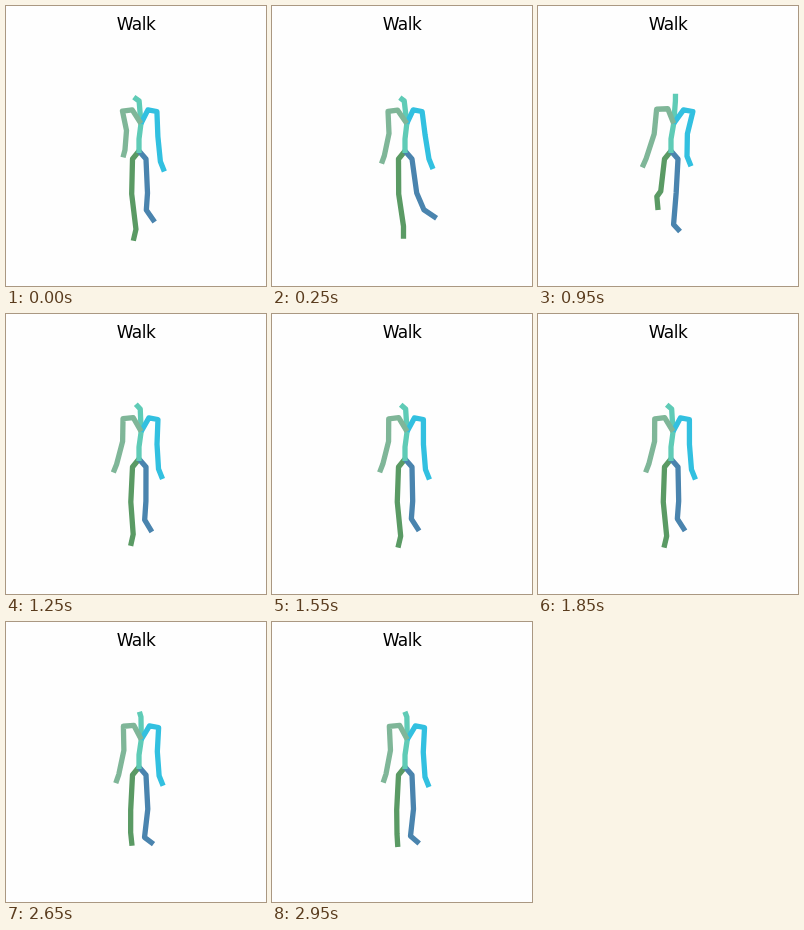
Animation of 260x280 px, one loop 3000 ms. Source, as an HTML page:

```html
<!DOCTYPE html>
<html lang="en">
<head>
<meta charset="utf-8">
<title>Walk</title>
<style>
  html, body { margin: 0; width: 100%; height: 100%; overflow: hidden; background: #fefefe; }
  svg { display: block; }
  polyline { fill: none; stroke-width: 5.3; stroke-linejoin: round; }
  text { font: 17px "DejaVu Sans", sans-serif; letter-spacing: -0.5px; text-anchor: middle; }
</style>
</head>
<body>
<svg width="260" height="280" viewBox="0 0 260 280">
  <text x="130" y="24">Walk</text>
  <polyline id="legR" stroke="#5a9a64"/>
  <polyline id="legL" stroke="#4a84ae"/>
  <polyline id="spine" stroke="#5fcbb6"/>
  <polyline id="armL" stroke="#32c0e0"/>
  <polyline id="armR" stroke="#7fb698"/>
</svg>
<script>
const LOOP = 3000, STEP = 50;
const CYCLE = 1350, PAUSE = 1300, RESUME = 1850, SLOW_CYCLE = 1750;

const draw = (id, ...points) =>
  document.getElementById(id).setAttribute("points", points.join(" "));
const add = (p, dx, dy) => [p[0] + dx, p[1] + dy];
const mid = (a, b, dx) => [(a[0] + b[0]) / 2 + dx, (a[1] + b[1]) / 2];

function render(t) {
  // One brisk stride, a pause, then a slow step that fades into standing.
  const phase = 360 * (Math.min(t, PAUSE) / CYCLE + Math.max(0, t - RESUME) / SLOW_CYCLE);
  const u = Math.max(0, (t - RESUME) / (LOOP - 50 - RESUME));
  const stride = 1 - Math.min(1, u * u * (3 - 2 * u));
  const cos = peak => Math.cos((phase - peak) * Math.PI / 180);
  const wave = (rest, size, peak) => rest + stride * size * cos(peak);
  const swing = peak => (stride * Math.max(0, cos(peak))) ** 2;

  const turn = wave(1.4, 2.3, 230);
  const hip = [133, 145], chest = [135 + turn * 0.2, 117.5];
  const neck = [133.2 + turn * 1.2, 95];
  const head = [neck[0] + wave(-2, 3.5, 200), 91 - turn * 0.9];
  draw("spine", [133, 147], [133, 133], chest, neck, head);

  const liftR = swing(240);
  const kneeR = [wave(124.7, 2, 60), 188 - 3 * liftR];
  const ankleR = [wave(125, 7, 45), wave(212, 12, 20) - 15 * liftR];
  const toeR = add(ankleR, wave(0.8, 3.5, 170), wave(13, -1.5, 0));
  draw("legR", hip, [126.5, 153], kneeR, ankleR, toeR);

  const liftL = swing(80);
  const kneeL = [wave(141.5, 3.5, 90), 187];
  const ankleL = [wave(138.5, 3, 60) + 11 * liftL, wave(214, 10, 190) - 5 * liftL];
  const toeL = add(ankleL, wave(8.7, 2.5, 100) + 2 * liftL, wave(7.5, 4.5, -10));
  draw("legL", hip, [140, 153], kneeL, ankleL, toeL);

  // The right arm starts close to the body and drops outwards.
  const tuck = Math.exp(-t / 200);
  const shoulderR = [116.5 + turn * 0.6, 105 - turn * 0.5];
  const wristR = [wave(114 - 5 * stride, 2, 10) + 8 * tuck, wave(152, -2, 0) - 6 * tuck];
  const elbowR = mid(shoulderR, wristR, 2.8);
  const handR = add(wristR, 0.3 * (wristR[0] - elbowR[0]) - 1.5, 0.3 * (wristR[1] - elbowR[1]) + 1.5);
  draw("armR", chest, [126.3 + turn, 103.8 - turn * 0.3], shoulderR, elbowR, wristR, handR);

  const shoulderL = [151 + turn * 1.1, 105.5];
  const wristL = [wave(153, 4, 70), wave(155 - 3.5 * stride, 4, 0)];
  const elbowL = mid(shoulderL, wristL, -0.8 - turn * 0.5);
  draw("armL", chest, [142 + turn, 103.9], shoulderL, elbowL, wristL, add(wristL, 4, 10));
}

function frame() {
  render(Math.floor(performance.now() % LOOP / STEP) * STEP);
  requestAnimationFrame(frame);
}
frame();
</script>
</body>
</html>
```
